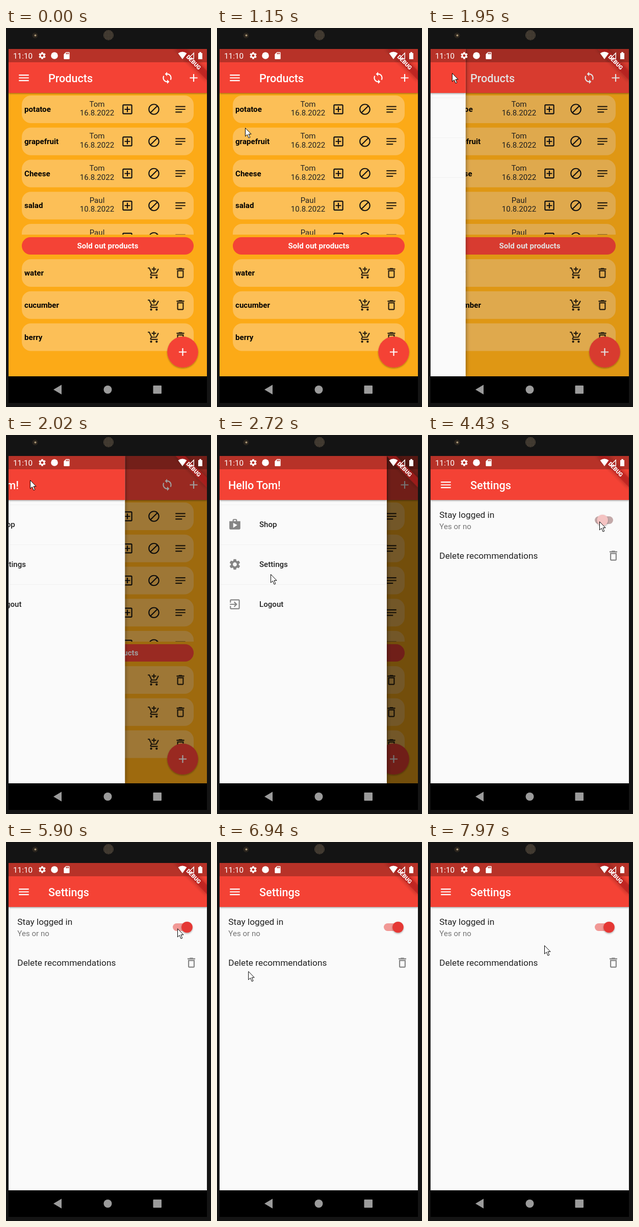
An HTML page for the animation above (8 s loop, 402 px wide and 741 px high).

```html
<!DOCTYPE html>
<html lang="en">
<head>
<meta charset="utf-8">
<title>Shopping list app</title>
<style>
  html, body { margin: 0; width: 100%; height: 100%; overflow: hidden; background: #141414; }
  svg { display: block; font-family: Roboto, sans-serif; }
</style>
</head>
<body>
<svg id="stage" width="402" height="741" viewBox="0 0 402 741"></svg>
<script>
const RED = '#f44336', PAPER = '#fafafa', INK = '#212121', GREY = '#858585';
const LOOP = 8000, STEP = 70, DRAWER = 328;

const ICONS = {
  menu: 'M3 18h18v-2H3zm0-5h18v-2H3zm0-7v2h18V6z',
  sync: 'M12 4V1L8 5l4 4V6c3.31 0 6 2.69 6 6 0 1.01-.25 1.97-.7 2.8l1.46 1.46C19.54 15.03 20 13.57 20 12c0-4.42-3.58-8-8-8zm0 14c-3.31 0-6-2.69-6-6 0-1.01.25-1.97.7-2.8L5.24 7.74C4.46 8.97 4 10.43 4 12c0 4.42 3.58 8 8 8v3l4-4-4-4z',
  add: 'M19 13h-6v6h-2v-6H5v-2h6V5h2v6h6z',
  addBox: 'M19 3H5c-1.11 0-2 .9-2 2v14c0 1.1.89 2 2 2h14c1.1 0 2-.9 2-2V5c0-1.1-.9-2-2-2zm0 16H5V5h14zm-8-2h2v-4h4v-2h-4V7h-2v4H7v2h4z',
  block: 'M12 2C6.5 2 2 6.5 2 12s4.5 10 10 10 10-4.5 10-10S17.5 2 12 2zM4 12c0-4.4 3.6-8 8-8 1.8 0 3.5.6 4.9 1.7L5.7 16.9C4.6 15.5 4 13.8 4 12zm8 8c-1.8 0-3.5-.6-4.9-1.7L18.3 7.1C19.4 8.5 20 10.2 20 12c0 4.4-3.6 8-8 8z',
  notes: 'M3 18h12v-2H3zM3 6v2h18V6zm0 7h18v-2H3z',
  cart: 'M11 9h2V6h3V4h-3V1h-2v3H8v2h3zm-4 9c-1.1 0-1.99.9-1.99 2S5.9 22 7 22s2-.9 2-2-.9-2-2-2zm10 0c-1.1 0-1.99.9-1.99 2s.89 2 1.99 2 2-.9 2-2-.9-2-2-2zm-9.83-3.25l.03-.12.9-1.63h7.45c.75 0 1.41-.41 1.75-1.03l3.86-7.01L19.42 4h-.01l-1.1 2-2.76 5H8.53l-.13-.27L6.16 6l-.95-2-.94-2H1v2h2l3.6 7.59-1.35 2.45c-.16.28-.25.61-.25.96 0 1.1.9 2 2 2h12v-2H7.42c-.13 0-.25-.11-.25-.25z',
  bin: 'M6 19c0 1.1.9 2 2 2h8c1.1 0 2-.9 2-2V7H6zM8 9h8v10H8zm7.5-5l-1-1h-5l-1 1H5v2h14V4z',
  gear: 'M19.14 12.94c.04-.3.06-.61.06-.94 0-.32-.02-.64-.07-.94l2.03-1.58c.18-.14.23-.41.12-.61l-1.92-3.32c-.12-.22-.37-.29-.59-.22l-2.39.96c-.5-.38-1.03-.7-1.62-.94l-.36-2.54c-.04-.24-.24-.41-.48-.41h-3.84c-.24 0-.43.17-.47.41l-.36 2.54c-.59.24-1.13.57-1.62.94l-2.39-.96c-.22-.08-.47 0-.59.22L2.74 8.87c-.12.21-.08.47.12.61l2.03 1.58c-.05.3-.09.63-.09.94s.02.64.07.94l-2.03 1.58c-.18.14-.23.41-.12.61l1.92 3.32c.12.22.37.29.59.22l2.39-.96c.5.38 1.03.7 1.62.94l.36 2.54c.05.24.24.41.48.41h3.84c.24 0 .44-.17.47-.41l.36-2.54c.59-.24 1.13-.56 1.62-.94l2.39.96c.22.08.47 0 .59-.22l1.92-3.32c.12-.22.07-.47-.12-.61zM12 15.6c-1.98 0-3.6-1.62-3.6-3.6s1.62-3.6 3.6-3.6 3.6 1.62 3.6 3.6-1.62 3.6-3.6 3.6z',
  shop: 'M16 6V4c0-1.11-.89-2-2-2h-4c-1.11 0-2 .89-2 2v2H2v13c0 1.11.89 2 2 2h16c1.11 0 2-.89 2-2V6zm-6-2h4v2h-4zM9 18V9l7.5 4z',
  exit: 'M10.09 15.59L11.5 17l5-5-5-5-1.41 1.41L12.67 11H3v2h9.67zM19 3H5c-1.11 0-2 .9-2 2v4h2V5h14v14H5v-4H3v4c0 1.1.89 2 2 2h14c1.1 0 2-.9 2-2V5c0-1.1-.9-2-2-2z',
  card: 'M18 2h-8L4 8v12c0 1.1.9 2 2 2h12c1.1 0 2-.9 2-2V4c0-1.1-.9-2-2-2zm-6 6h-2V4h2zm3 0h-2V4h2zm3 0h-2V4h2z'
};

const icon = (name, x, y, fill = '#111', size = 25.9) =>
  `<path fill="${fill}" transform="translate(${x - size / 2} ${y - size / 2}) scale(${size / 24})" d="${ICONS[name]}"/>`;
const text = (s, x, y, size = 15.1, weight = 400, fill = INK, anchor = 'start') =>
  `<text x="${x}" y="${y}" font-size="${size}" font-weight="${weight}" fill="${fill}" text-anchor="${anchor}">${s}</text>`;
const rect = (x, y, w, h, fill, extra = '') =>
  `<rect x="${x}" y="${y}" width="${w}" height="${h}" fill="${fill}" ${extra}/>`;
const screen = (fill, extra) => rect(5, 41, 389, 640, fill, extra);
const appBar = (title, width, x) =>
  rect(5, 41, width, 86, RED, 'filter="url(#shadow)"') + text(title, x, 105.5, 21.6, 500, '#fff');
const card = (y, name) =>
  rect(31, y, 337, 54, '#fcbf57', 'rx="18"') + text(name, 36, y + 32, 15.1, 700, '#000');

function product([name, who, date], i) {
  const y = 132 + i * 62.75, mid = y + 27;
  return card(y, name) +
    text(who, 178.5, y + 21.5, 15.1, 400, INK, 'middle') +
    text(date, 178.5, y + 39, 15.1, 400, INK, 'middle') +
    icon('addBox', 238, mid) + icon('block', 290, mid) + icon('notes', 342, mid, '#2b2110');
}

function soldOut(name, i) {
  const y = 452 + i * 62.75;
  return card(y, name) + icon('cart', 290, y + 27, '#2b2110') + icon('bin', 342, y + 27, '#2b2110');
}

const products = [
  ['potatoe', 'Tom', '16.8.2022'], ['grapefruit', 'Tom', '16.8.2022'], ['Cheese', 'Tom', '16.8.2022'],
  ['salad', 'Paul', '10.8.2022'], ['', 'Paul', '']
];

const productsPage = screen('#fcaa17') +
  `<g clip-path="url(#listClip)">${products.map(product).join('')}</g>` +
  rect(31, 409, 337, 34, RED, 'rx="17"') +
  text('Sold out products', 199.5, 431.3, 15.1, 700, '#fff', 'middle') +
  ['water', 'cucumber', 'berry'].map(soldOut).join('') +
  `<circle cx="346.5" cy="633.5" r="30.3" fill="${RED}" filter="url(#shadow)"/>` + icon('add', 346.5, 633.5, '#fff') +
  appBar('Products', 389, 83) + icon('menu', 35, 97.5, '#fff') +
  icon('sync', 316, 97.5, '#fff') + icon('add', 368, 97.5, '#fff') +
  '<circle id="menuRipple" cx="35" cy="97" fill="#e0a050"/>';

const drawerItem = ([glyph, label], i) => {
  const y = 175 + i * 78;
  return rect(5, y - 39, DRAWER, 1, '#f1f1f1') + icon(glyph, 35, y, GREY) + text(label, 83, y + 5.3, 15.1, 500);
};

const drawer = rect(5, 41, DRAWER, 640, PAPER, 'filter="url(#deepShadow)"') +
  '<g clip-path="url(#rowClip)"><circle id="rowRipple" cx="105" cy="272"/></g>' +
  [['shop', 'Shop'], ['gear', 'Settings'], ['exit', 'Logout']].map(drawerItem).join('') +
  appBar('Hello Tom!', DRAWER, 22);

const settingsPage = screen(PAPER) + appBar('Settings', 389, 83) + icon('menu', 35, 97.5, '#fff') +
  text('Stay logged in', 22.3, 162, 17.3) + text('Yes or no', 22.3, 184, 15.1, 400, '#757575') +
  text('Delete recommendations', 22.3, 241.8, 17.3) + icon('bin', 363.5, 236, GREY) +
  rect(327, 159, 36, 15, '', 'rx="7.5" id="track"') +
  '<circle id="thumb" cy="166.5" r="10.8" filter="url(#shadow)"/>';

const statusBar = rect(5, 41, 389, 26, '#000', 'opacity=".25"') +
  `<g transform="translate(394 41) rotate(45)">
    ${rect(-43.2, 30.3, 86.4, 13, '#b71c1c', 'fill-opacity=".63" filter="url(#deepShadow)"')}
    ${text('DEBUG', 0, 40.7, 11, 900, '#fff', 'middle')}</g>` +
  text('11:10', 14, 59.7, 15.3, 400, '#fff') + icon('gear', 71, 54, '#fff', 17) +
  '<circle cx="95" cy="54" r="6.8" fill="#fff"/>' + icon('card', 119, 54, '#fff', 17) +
  `<path fill="#fff" d="M337.5 49.5Q346 43.5 354.5 49.5L346 61z"/>
   <path fill="none" stroke="#fff" stroke-width="1.5" d="M368.2 49v11h-11z"/>
   <path fill="#fff" d="M377 49h2.3v-2h3.4v2h2.3v12h-8z"/>`;

const device = `
  <circle cx="57" cy="14.5" r="5.5" fill="#2b251e"/><circle cx="57.5" cy="14.5" r="2" fill="#a59273"/>
  <circle cx="201" cy="14" r="10" fill="#50473b"/><circle cx="201" cy="14" r="10" fill="url(#grill)"/>
  ${rect(5, 681, 389, 52, '#000')}
  <g fill="#9b9b9b"><path d="M93 707l16-9.5v19z"/><circle cx="199.5" cy="707" r="8"/>
  ${rect(288.5, 699, 16.5, 16, '#9b9b9b', 'rx="1"')}</g>`;

const stage = document.getElementById('stage');
stage.innerHTML = `
  <defs>
    <clipPath id="screenClip">${screen('#000')}</clipPath>
    <clipPath id="listClip">${rect(5, 127, 389, 277, '#000')}</clipPath>
    <clipPath id="rowClip">${rect(5, 214, DRAWER, 78, '#000')}</clipPath>
    <pattern id="grill" width="3" height="3" patternUnits="userSpaceOnUse"><circle cx="1.5" cy="1.5" r=".9" fill="#1c1814"/></pattern>
    <filter id="shadow" x="-30%" y="-30%" width="160%" height="160%"><feDropShadow dx="0" dy="1.5" stdDeviation="1.6" flood-opacity=".35"/></filter>
    <filter id="deepShadow" x="-30%" y="-50%" width="160%" height="200%"><feDropShadow dx="0" dy="0" stdDeviation="4" flood-opacity=".5"/></filter>
  </defs>
  ${rect(0, 0, 402, 741, '#141414')}${device}
  <g clip-path="url(#screenClip)">
    <g id="home">${productsPage}${screen('#000', 'id="drawerScrim"')}<g id="drawer">${drawer}</g></g>
    ${screen('#000', 'id="pageScrim"')}
    <g id="settings">${settingsPage}</g>
    ${statusBar}
  </g>
  <path id="cursor" fill="#fff" stroke="#000" stroke-linejoin="round" d="M.5.5v16.3l3.8-3.5 2.8 6.7 2.7-1.1-2.8-6.5h5z"/>`;

const set = (id, attrs) => {
  const el = document.getElementById(id);
  for (const key in attrs) el.setAttribute(key, attrs[key]);
};
const progress = (t, from, to) => t <= from ? 0 : t >= to ? 1 : (t - from) / (to - from);

// Pointer path as [time, x, y]; it moves in discrete steps counted from each start.
const path = [
  [590, 150, 715], [730, 98, 600], [870, 40, 455], [1010, 9, 310], [1150, 55, 195], [1360, 47, 106], [1430, 47, 88],
  [2370, 47, 88], [2580, 88, 205], [2720, 105, 272], [3050, 105, 272], [3330, 111, 254],
  [3600, 111, 254], [3950, 341, 178], [4090, 336, 169],
  [5900, 336, 169], [6180, 371, 228], [6660, 194, 262], [6940, 25, 250], [7220, 382, 240], [7360, 368, 231],
  [7690, 368, 231], [7970, 228, 202]
];
const starts = [590, 2440, 2920, 3670, 5900, 7760];

function pointer(t) {
  const start = starts.filter(s => s <= t).pop();
  if (start === undefined) return null;
  const time = start + Math.floor((t - start) / STEP) * STEP;
  const next = path.findIndex(p => p[0] > time);
  if (next < 0) return path[path.length - 1].slice(1);
  const [a, b] = [path[next - 1], path[next]], k = progress(time, a[0], b[0]);
  return [a[1] + (b[1] - a[1]) * k, a[2] + (b[2] - a[2]) * k];
}

const zoom = s => `translate(199.5 361) scale(${s}) translate(-199.5 -361)`;

function draw(t) {
  // Critically damped spring for the drawer
  const spring = t > 1913 ? (t - 1913) * .0224 : 0;
  const open = t > 2240 ? 1 : 1 - (1 + spring) * Math.exp(-spring);
  set('drawer', { transform: `translate(${(open - 1) * DRAWER})`, visibility: open ? 'visible' : 'hidden' });
  set('drawerScrim', { opacity: .54 * open });
  set('menuRipple', { r: 8 + 29 * progress(t, 1760, 1930), opacity: t < 1760 ? 0 : .45 * (1 - progress(t, 1960, 2240)) });
  set('rowRipple', { r: 20 + 230 * progress(t, 2920, 3180), opacity: t < 2920 ? 0 : .08 });

  const p = progress(t, 3126, 3426), ease = 1 - (1 - p) ** 3;
  set('home', { transform: zoom(1 + .05 * ease), visibility: p < 1 ? 'visible' : 'hidden' });
  set('pageScrim', { opacity: .6 * ease });
  set('settings', { transform: zoom(.85 + .15 * ease), opacity: progress(p, .125, .25) });

  const off = progress(t, 4250, 4530) - progress(t, 4730, 5070);
  const on = 1 - off * off * (3 - 2 * off);
  const mix = (a, b) => `rgb(${a.map((v, i) => Math.round(v + (b[i] - v) * on))})`;
  set('track', { fill: mix([176, 176, 176], [241, 153, 150]) });
  set('thumb', { cx: 337 + 18 * on, fill: mix([250, 250, 250], [229, 57, 53]) });

  const at = pointer(t);
  set('cursor', { visibility: at ? 'visible' : 'hidden', transform: `translate(${at || '0,0'})` });
}

function tick() {
  draw(performance.now() % LOOP);
  requestAnimationFrame(tick);
}
tick();
</script>
</body>
</html>
```
